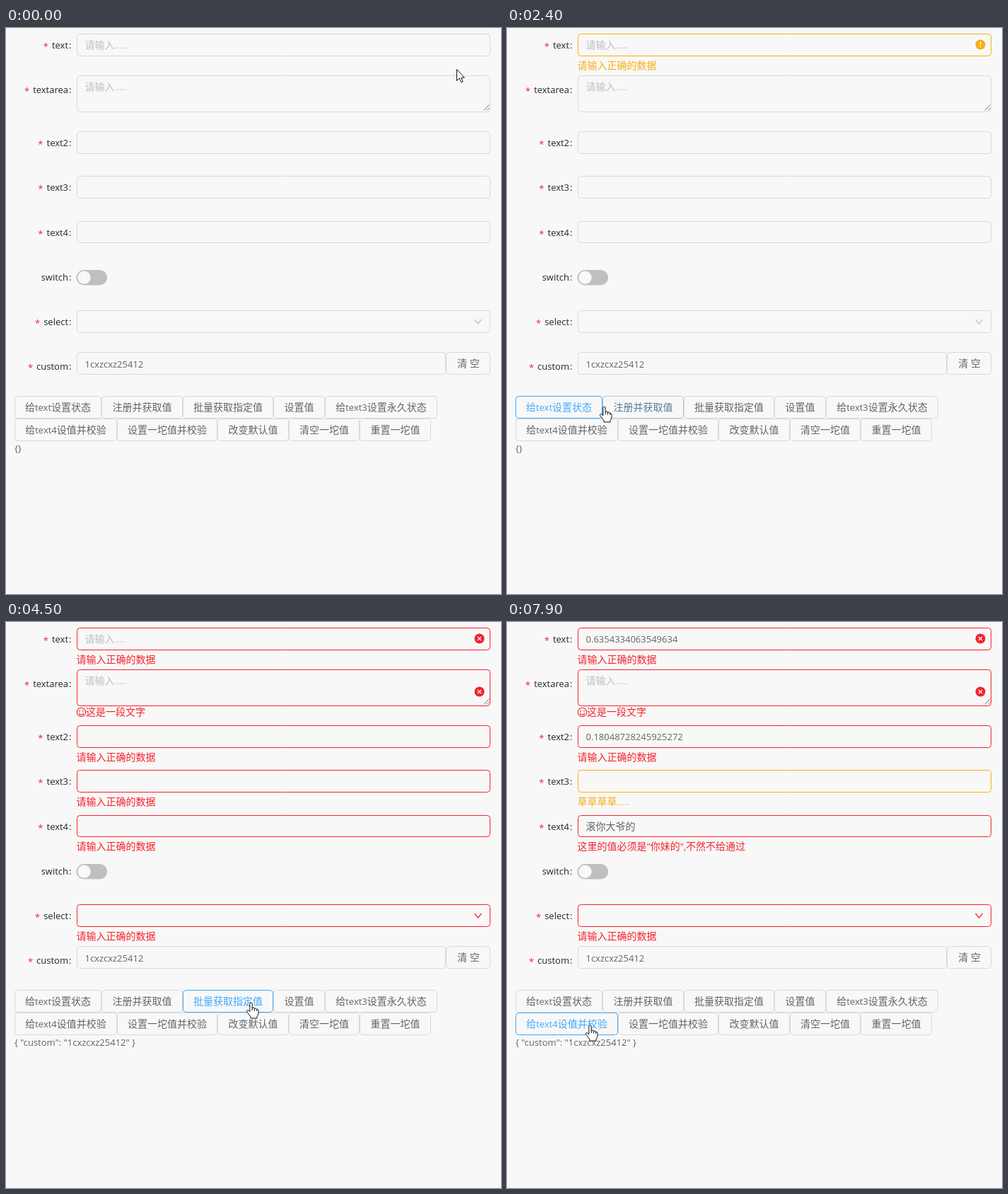
An HTML page with a canvas that plays this animation: 700 px wide and 800 px high, repeating every 8000 ms.

```html
<!DOCTYPE html>
<html lang="zh">
<head>
<meta charset="utf-8">
<style>
html, body { margin: 0; width: 700px; height: 800px; overflow: hidden; background: #f8f8f8; }
canvas { display: block; }
</style>
</head>
<body>
<canvas id="stage" width="700" height="800"></canvas>
<script>
const g = document.getElementById('stage').getContext('2d');
const LOOP = 8000, STEP = 100, FADE = 300;
const BG = '#f8f8f8', TEXT = [100, 100, 100], LINE = [217, 217, 217], HINT = [191, 191, 191];
const RED = [245, 34, 45], ORANGE = [250, 173, 20], BLUE = [64, 169, 255];
const WRONG = '请输入正确的数据';

const clamp = v => Math.max(0, Math.min(1, v));
const mix = (a, b, k) => a.map((v, i) => v + (b[i] - v) * k);
const rgb = (c, a = 1) => `rgba(${c.map(Math.round)},${a})`;
const fade = (t, start) => clamp((t - start) / FADE);

// Each state change blends in over the CSS transition time.
const tint = (base, states, t) => states.reduce((c, [at, to]) => mix(c, to, fade(t, at)), base);

const invalid = [[2650, RED]];
const fields = [
  { label: 'text', y: 8, h: 32, hint: '请输入.....', value: '0.6354334063549634', valueAt: 4900,
    states: [[1250, ORANGE], ...invalid], msgAt: 1400 },
  { label: 'textarea', y: 67, h: 52, labelY: 87, hint: '请输入.....', states: invalid, msg: '这是一段文字', smile: true },
  { label: 'text2', y: 146, h: 32, value: '0.18048728245925272', valueAt: 4900, states: invalid },
  { label: 'text3', y: 209, h: 32, states: [...invalid, [5650, ORANGE]], next: '草草草草.....', nextAt: 5800 },
  { label: 'text4', y: 273, h: 31, value: '滚你大爷的', valueAt: 7200, states: invalid,
    next: '这里的值必须是"你妹的",不然不给通过', nextAt: 7200 },
  { label: 'select', y: 399, h: 32, states: invalid, select: true },
];

// Buttons: left, right, row top, caption, highlight start and end, click time
const buttons = [
  [12, 135, 520, '给text设置状态', 650, 2550, 1300],
  [135, 250, 520, '注册并获取值', 2450, 3850, 2900],
  [250, 378, 520, '批量获取指定值', 3600, 4700, 3850],
  [378, 451, 520, '设置值', 4600, 5700, 4850],
  [451, 610, 520, '给text3设置永久状态', 4950, 7100, 5750],
  [12, 157, 552, '给text4设值并校验', 6900, 9999, 7250],
  [157, 299, 552, '设置一坨值并校验'],
  [299, 400, 552, '改变默认值'],
  [400, 500, 552, '清空一坨值'],
  [500, 601, 552, '重置一坨值'],
];

// Pointer waypoints: time, x, y
const path = [
  [0, 637, 58], [200, 560, 62], [300, 430, 74], [400, 300, 110], [500, 170, 220], [600, 97, 322],
  [700, 86, 430], [800, 82, 548], [900, 85, 530], [2200, 85, 530], [2600, 190, 538], [2800, 197, 533],
  [3400, 197, 533], [3700, 312, 537], [4400, 312, 537], [4700, 418, 538], [4900, 418, 538],
  [5200, 486, 532], [5300, 488, 532], [5500, 505, 534], [6400, 505, 534], [6800, 300, 552],
  [7100, 122, 566], [7200, 118, 569], [LOOP, 118, 569],
];
const arrow = new Path2D('M.5.5V16.5L4.2 13 6.8 18.8 9.2 17.8 6.7 12.2H11.3Z');
const hand = new Path2D('M-2.2 14V2.8A1.7 1.7 0 0 1 1.2 2.8V8.2Q4 7.2 4.4 9.2 7.2 8.4 7.6 10.4 10 10 10 12.5V16Q10 18 8 20.5V23H-1V21Q-3 18-6 14.5-7.5 12-5.5 11.5-4 11.5-2.2 14Z');
const knuckles = new Path2D('M1.2 8V12M4.4 9V12.5M7.6 10.4V13');

function pointerAt(t) {
  const i = path.findIndex(p => p[0] > t), a = path[i - 1], b = path[i];
  const k = (t - a[0]) / (b[0] - a[0]);
  return [a[1] + (b[1] - a[1]) * k, a[2] + (b[2] - a[2]) * k];
}

// Latin runs are set slightly smaller than the Chinese ones.
function textRuns(str) {
  let w = 0;
  const runs = str.match(/[\x00-\x7f]+|[^\x00-\x7f]+/g).map(s => {
    const font = s.charCodeAt(0) < 128 ? '13px "Open Sans", sans-serif' : '14px "Noto Sans CJK SC", "Noto Sans CJK", sans-serif';
    g.font = font;
    const run = { s, font, x: w };
    w += g.measureText(s).width;
    return run;
  });
  return { runs, w };
}

// Draws text around the middle line cy; align is 0 left, .5 centre, 1 right. Returns its left edge.
function text(str, x, cy, color, align = 0) {
  const { runs, w } = textRuns(str), left = x - w * align;
  g.fillStyle = color;
  for (const r of runs) {
    g.font = r.font;
    g.fillText(r.s, left + r.x, cy + 5);
  }
  return left;
}

function box(x, y, w, h, color) {
  g.beginPath();
  g.roundRect(x + .5, y + .5, w - 1, h - 1, 4);
  g.strokeStyle = color;
  g.lineWidth = 1;
  g.stroke();
}

function lines(color, width, ...strokes) {
  g.beginPath();
  for (const [x, y, ...rest] of strokes) {
    g.moveTo(x, y);
    for (let i = 0; i < rest.length; i += 2) g.lineTo(rest[i], rest[i + 1]);
  }
  g.strokeStyle = color;
  g.lineWidth = width;
  g.stroke();
}

function disc(x, y, r, color) {
  g.beginPath();
  g.arc(x, y, r, 0, 7);
  g.fillStyle = color;
  g.fill();
}

function label(name, cy, required = true) {
  text(':', 92.5, cy, '#262626', 1);
  const left = text(name, 88, cy, '#262626', 1);
  if (required) text('*', left - 5, cy + 2, rgb(RED), 1);
}

function statusIcon(y, error) {
  disc(669.5, y, 7, rgb(error ? RED : ORANGE));
  if (error) lines('#fff', 1.2, [667, y - 2.5, 672, y + 2.5], [672, y - 2.5, 667, y + 2.5]);
  else lines('#fff', 1.4, [669.5, y - 4, 669.5, y + 1], [669.5, y + 2.3, 669.5, y + 3.8]);
}

function smiley(x, y, color) {
  g.strokeStyle = color;
  g.lineWidth = 1.1;
  g.beginPath();
  g.arc(x, y, 6.2, 0, 7);
  g.moveTo(x + 3, y + 1);
  g.arc(x, y + 1, 3, 0, Math.PI);
  g.stroke();
  disc(x - 2.5, y - 1.8, .9, color);
  disc(x + 2.5, y - 1.8, .9, color);
}

function message(f, t) {
  const k = fade(t, f.msgAt || 2800);
  if (!k) return;
  const str = t >= f.nextAt ? f.next : f.msg || WRONG;
  const cy = f.y + f.h + (f.smile ? 8 : 13) - 5 * (1 - k);
  const color = rgb(tint(RED, f.states, t), k);
  if (f.smile) smiley(106.5, cy + .5, color);
  text(str, f.smile ? 113 : 99.5, cy, color);
}

function field(f, t, hover) {
  const mid = f.y + 16;
  label(f.label, f.labelY || mid);
  const border = tint(LINE, f.states, t);
  box(100, f.y, 585, f.h, rgb(hover ? mix(border, BLUE, .5) : border));
  if (t >= f.valueAt) text(f.value, 111.5, mid, rgb(TEXT));
  else if (f.hint) text(f.hint, 111.5, mid, rgb(HINT));
  if (f.select) lines(rgb(tint(HINT, f.states, t)), 1.2, [662.5, 412, 667.5, 418, 672.5, 412]);
  if (f.labelY) lines('#777', 1, [675.5, 116.5, 683.5, 108.5], [680, 116.5, 683.5, 113]);
  if (f.hint && t >= (f.msgAt ? 1400 : 2900)) statusIcon(f.labelY ? 98.5 : 23.5, t >= 2900);
  message(f, t);
}

function button([x, right, y, caption, on, off, click], t, hover) {
  const k = Math.max(on ? fade(t, on) - fade(t, off) : 0, hover ? .3 : 0);
  const wave = (t - click) / 400;
  if (wave > 0 && wave < 1) {
    const spread = 3 * clamp(wave * 3);
    g.beginPath();
    g.roundRect(x - spread / 2, y - spread / 2, right - x + spread, 32 + spread, 5);
    g.strokeStyle = rgb(BLUE, .25 * (1 - wave));
    g.lineWidth = spread;
    g.stroke();
  }
  box(x, y, right - x, 32, rgb(mix(LINE, BLUE, k)));
  text(caption, (x + right) / 2, y + 16, rgb(mix(TEXT, BLUE, k)), .5);
}

function pointer(x, y, kind) {
  g.save();
  g.translate(Math.round(x), Math.round(y));
  if (kind === 'text') {
    lines('#222', 1, [.5, -8, .5, 8], [-2.5, -8.5, 3.5, -8.5], [-2.5, 8.5, 3.5, 8.5]);
  } else {
    const shape = kind === 'hand' ? hand : arrow;
    g.fillStyle = '#fff';
    g.strokeStyle = '#111';
    g.lineWidth = 1;
    g.fill(shape);
    g.stroke(shape);
    if (kind === 'hand') g.stroke(knuckles);
  }
  g.restore();
}

function draw(t) {
  const [px, py] = pointerAt(t);
  const inside = (x, y, right, bottom) => px >= x && px < right && py >= y && py < bottom;
  let kind = 'arrow';
  g.fillStyle = BG;
  g.fillRect(0, 0, 700, 800);

  for (const f of fields) {
    const hover = inside(100, f.y, 685, f.y + f.h) && t > 0;
    if (hover) kind = 'text';
    field(f, t, hover);
  }

  label('switch', 352, false);
  g.beginPath();
  g.roundRect(99.5, 342, 43.5, 21.5, 10.75);
  g.fillStyle = '#bfbfbf';
  g.fill();
  disc(110.5, 352.7, 9.2, BG);

  label('custom', 478);
  box(100, 458, 522, 32, rgb(LINE));
  box(622, 458, 63, 32, rgb(LINE));
  text('1cxzcxz25412', 111.5, 475, rgb(TEXT));
  text('清 空', 654, 474, rgb(TEXT), .5);

  for (const b of buttons) {
    const hover = inside(b[0], b[2], b[1], b[2] + 32);
    if (hover) kind = 'hand';
    button(b, t, hover);
  }

  const values = '{ "custom": "1cxzcxz25412" }';
  const result = t < 2900 ? '{}' : t < 3900 ? `{ "error": true, "values": ${values} }` : values;
  text(result, 12, 594, rgb(TEXT));
  pointer(px, py, kind);
}

function tick(now) {
  draw(Math.floor(now % LOOP / STEP) * STEP);
  requestAnimationFrame(tick);
}
requestAnimationFrame(tick);
</script>
</body>
</html>
```
